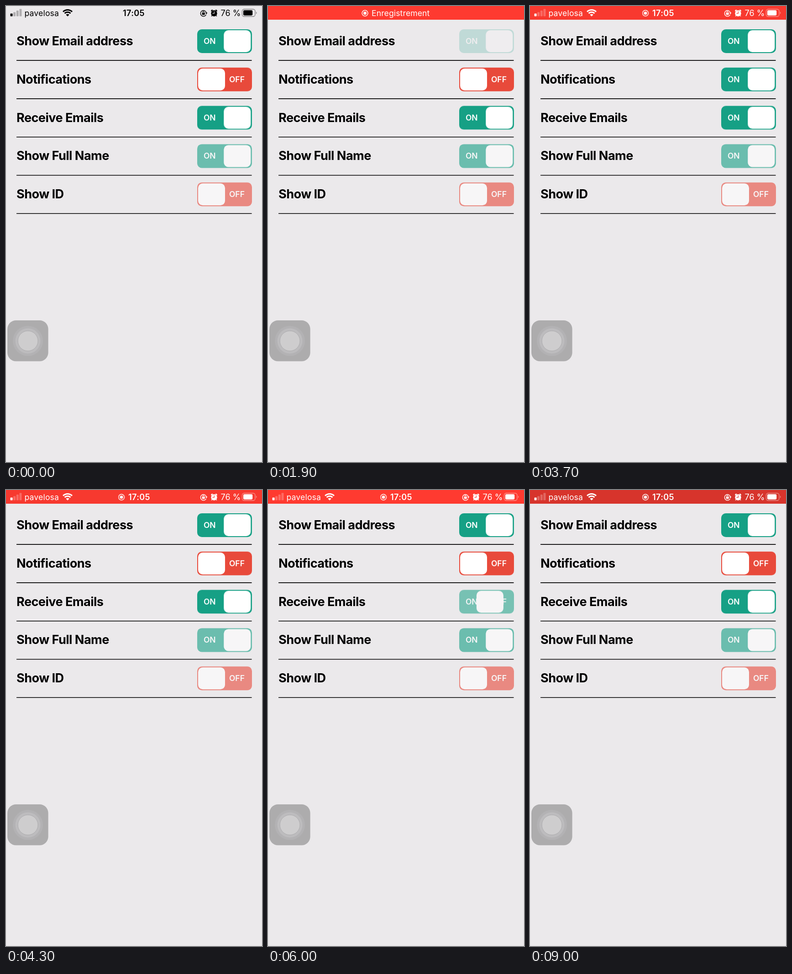
Animation, 561 px wide and 998 px high, one loop 9.1 s. Source, as an HTML page:

```html
<!DOCTYPE html>
<html lang="en">
<head>
<meta charset="utf-8">
<title>Toggle settings</title>
<style>
  :root { --loop: 9.1s; --green: #16a085; --red: #e84a3b; }
  html, body { margin: 0; width: 100%; height: 100%; overflow: hidden; background: #ebe9eb; }
  body { position: relative; font-family: Inter, "Open Sans", sans-serif; }

  /* status bar */
  .top { position: absolute; left: 0; top: 0; width: 561px; height: 30px; overflow: hidden; }
  .top text { font-size: 17.5px; fill: currentColor; }
  .top .time { font-size: 18px; font-weight: 600; letter-spacing: .4px; }
  .faint { opacity: .25; }
  .bar { animation: show var(--loop) infinite, pulse var(--loop) ease-in-out infinite; }
  .status { animation: blink var(--loop) infinite, ink var(--loop) step-end infinite; }
  .dark { color: #000; animation: hide var(--loop) infinite; }
  .rec { color: #fff; animation: show var(--loop) infinite; }
  .rec g { animation: shift var(--loop) ease-in-out infinite; }
  .rec .label { animation: label var(--loop) infinite; }
  .rec .time { animation: late var(--loop) infinite; }

  @keyframes show { 0%, 3.3% { opacity: 0 } 6.6%, 100% { opacity: 1 } }
  @keyframes hide { 0%, 3.3% { opacity: 1 } 6.6%, 100% { opacity: 0 } }
  @keyframes late { 0%, 36.8% { opacity: 0 } 40.4%, 100% { opacity: 1 } }
  @keyframes label { 0%, 36.8% { opacity: 1 } 41.2%, 100% { opacity: 0 } }
  @keyframes blink { 0%, 3.3% { opacity: 1 } 6.6%, 36.8% { opacity: 0 } 40.4%, 100% { opacity: 1 } }
  @keyframes ink { 0% { color: #000 } 8%, 100% { color: #fff } }
  @keyframes shift { 0%, 36.8% { transform: none } 40%, 100% { transform: translateX(40.5px) } }
  @keyframes pulse {
    0%, 21.98%, 43.96%, 65.93%, 87.91% { fill: #ff3a30 }
    10.99%, 32.97%, 54.95%, 76.92%, 98.9%, 100% { fill: #d7342c }
  }

  /* settings rows */
  .rules { position: absolute; left: 0; top: 0; }
  .row {
    position: absolute; left: 23px; top: 51px; width: 515.5px; height: 52px; line-height: 52px;
    transform: translateY(calc(var(--i) * 83.8px));
  }
  .row b { font-size: 27px; letter-spacing: -.5px; white-space: nowrap; }
  .switch {
    --on: 56.3px; --rest: var(--on); --away: 0px; --hue: var(--green); --flip: var(--red);
    position: absolute; right: 0; top: 0; width: 119.6px; height: 52px; border-radius: 10px;
    background: var(--hue); color: #fff; font-size: 17.5px; font-weight: 600;
  }
  .switch.off { --rest: 0px; --away: var(--on); --hue: var(--red); --flip: var(--green); }
  .switch span { position: absolute; top: 0; left: 14px; }
  .switch span + span { left: 70px; }
  .switch i {
    position: absolute; left: 2px; top: 2px; width: 59.5px; height: 48px; border-radius: 10px;
    background: #fff; transform: translateX(var(--rest));
  }
  .disabled { opacity: .6; }
  .tapped {
    animation: press var(--loop) cubic-bezier(.455, .03, .515, .955) var(--at) infinite,
               flip var(--loop) step-end var(--at) infinite;
  }
  .tapped i { animation: slide var(--loop) cubic-bezier(.455, .03, .515, .955) var(--at) infinite; }

  /* two taps: away from rest, then back */
  @keyframes press {
    0%, 4.95%, 7.69%, 12.65%, 100% { opacity: 1 }
    1.2%, 2.2%, 8.9%, 9.9% { opacity: .2 }
  }
  @keyframes flip { 0%, 9.9%, 100% { background: var(--hue) } 2.2% { background: var(--flip) } }
  @keyframes slide {
    0%, 2.2%, 12.1%, 100% { transform: translateX(var(--rest)) }
    4.4%, 9.9% { transform: translateX(var(--away)) }
  }

  .assist { position: absolute; left: 3px; top: 688px; }
</style>
</head>
<body>
<svg class="top" viewBox="0 0 561 30">
  <rect class="bar" width="561" height="30"/>

  <g class="status" fill="currentColor">
    <rect x="9.5" y="16.5" width="5" height="6" rx="1"/>
    <g class="faint">
      <rect x="16" y="13.5" width="5" height="9" rx="1"/>
      <rect x="22.7" y="10" width="5" height="12.5" rx="1"/>
      <rect x="29.4" y="6.5" width="5" height="16" rx="1"/>
    </g>
    <text x="40.5" y="22" letter-spacing=".2">pavelosa</text>
    <path d="M135 22.8L131.3 19.1A5.2 5.2 0 0 1 138.7 19.1Z"/>
    <path d="M125.1 12.6A14 14 0 0 1 144.9 12.6M128.6 16.1A9 9 0 0 1 141.4 16.1" fill="none" stroke="currentColor" stroke-width="3"/>

    <path d="M438.6 18.8A6.4 6.4 0 1 1 439 14.8" fill="none" stroke="currentColor" stroke-width="1.5"/>
    <path d="M436.6 14.6h5l-2.5 3.4z"/>
    <rect x="429.7" y="14.8" width="6" height="4.8" rx=".8"/>
    <path d="M431 15v-1.4a1.7 1.7 0 0 1 3.4 0V15" fill="none" stroke="currentColor" stroke-width="1.1"/>

    <path fill-rule="evenodd" d="M456 9.3a6.7 6.7 0 1 1 0 13.4a6.7 6.7 0 1 1 0-13.4zM455.6 11.8v4.1h-3.2v1.2h4.4v-5.3z"/>
    <path d="M449.6 12.2a2.6 2.6 0 0 1 4-3.3zM462.4 12.2a2.6 2.6 0 0 0-4-3.3z"/>
    <path d="M451.8 20.5l-1.7 2M460.2 20.5l1.7 2" stroke="currentColor" stroke-width="1.5"/>

    <text x="470.5" y="22" style="font-size:18px">76 %</text>
    <rect x="517.5" y="7" width="28.5" height="16" rx="4.5" fill="none" stroke="currentColor" stroke-width="1.3" opacity=".45"/>
    <path d="M548 12.2a3.4 3.4 0 0 1 0 5.6z" opacity=".45"/>
    <rect x="520" y="9.3" width="20.3" height="11.4" rx="2.4"/>
  </g>

  <text class="dark time" x="280" y="22" text-anchor="middle">17:05</text>

  <g class="rec">
    <g>
      <circle cx="212.5" cy="15.7" r="6.4" fill="none" stroke="#fff" stroke-width="1.5"/>
      <circle cx="212.5" cy="15.7" r="3.4" fill="#fff"/>
      <text class="label" x="227" y="22" letter-spacing=".15">Enregistrement</text>
    </g>
    <text class="time" x="292" y="22" text-anchor="middle">17:05</text>
  </g>
</svg>

<svg class="rules" width="561" height="460">
  <path d="M23 119.1h515.5m-515.5 83.8h515.5m-515.5 83.8h515.5m-515.5 83.8h515.5m-515.5 83.8h515.5" stroke="#000" stroke-width="1.6"/>
</svg>

<div class="row" style="--i:0"><b>Show Email address</b>
  <div class="switch tapped" style="--at:1.786s"><span>ON</span><span>OFF</span><i></i></div></div>
<div class="row" style="--i:1"><b>Notifications</b>
  <div class="switch off tapped" style="--at:3.15s"><span>ON</span><span>OFF</span><i></i></div></div>
<div class="row" style="--i:2"><b>Receive Emails</b>
  <div class="switch tapped" style="--at:4.986s"><span>ON</span><span>OFF</span><i></i></div></div>
<div class="row" style="--i:3"><b>Show Full Name</b>
  <div class="switch disabled"><span>ON</span><span>OFF</span><i></i></div></div>
<div class="row" style="--i:4"><b>Show ID</b>
  <div class="switch off disabled"><span>ON</span><span>OFF</span><i></i></div></div>

<svg class="assist" width="90" height="90">
  <rect width="89.6" height="89.6" rx="19" fill="#adacad"/>
  <circle cx="45" cy="45" r="33" fill="#b3b2b4"/>
  <circle cx="45" cy="45" r="27.5" fill="#bdbcbe"/>
  <circle cx="45" cy="45" r="22" fill="#cecdce" stroke="#adacae"/>
</svg>
</body>
</html>
```
